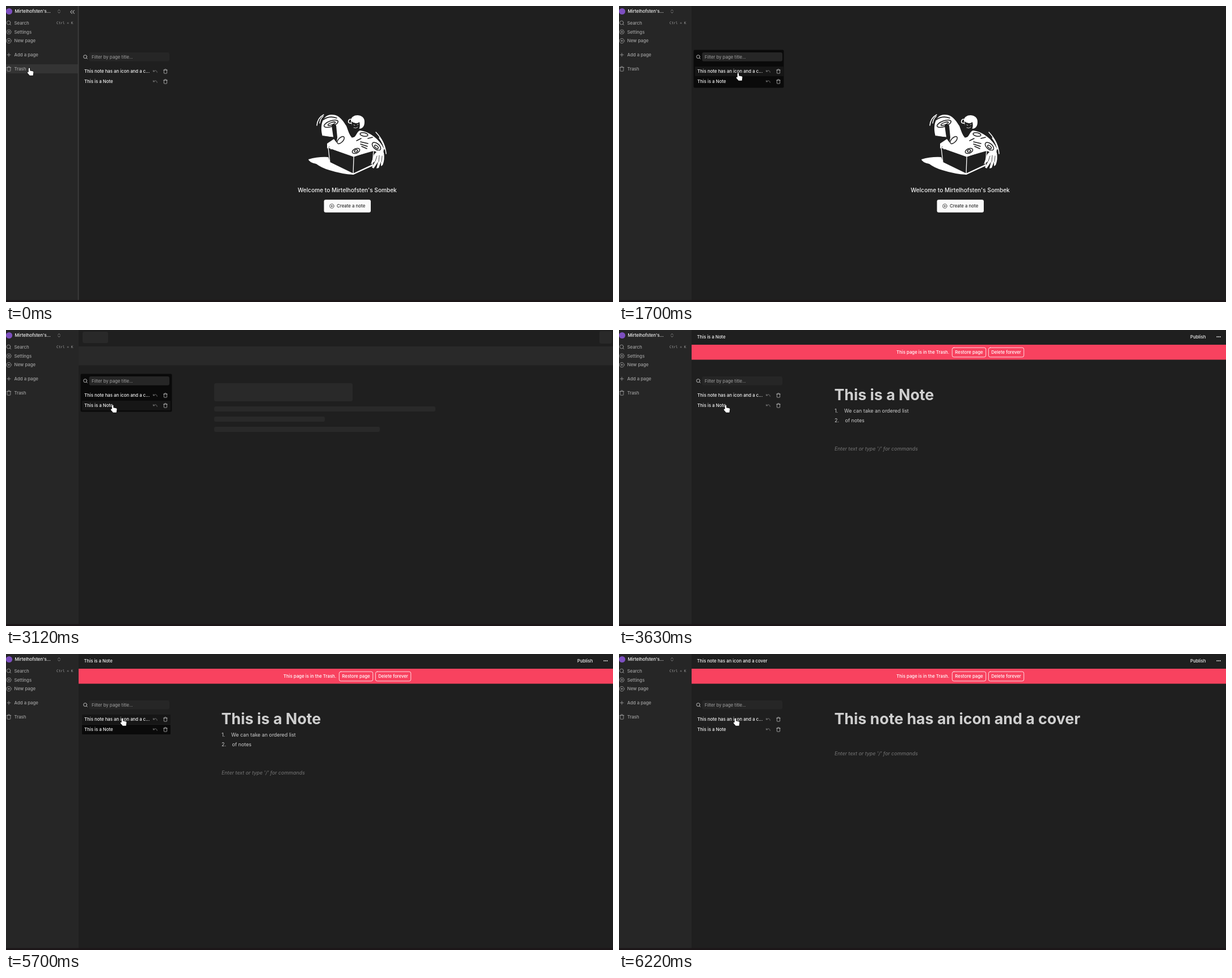
These frames come from a looping animation (1070 px wide and 523 px high, 8 s). An HTML page with a canvas:

```html
<!DOCTYPE html>
<html lang="en">
<head>
<meta charset="utf-8">
<title>Notes trash</title>
<style>
html, body { margin: 0; width: 100%; height: 100%; overflow: hidden; background: #1f1f1f; }
canvas { display: block; width: 100%; height: 100%; }
</style>
</head>
<body>
<canvas id="stage"></canvas>
<script>
const W = 1070, H = 523, LOOP = 8000;
const canvas = document.getElementById('stage');
const ctx = canvas.getContext('2d');
const ratio = window.devicePixelRatio || 1;
canvas.width = W * ratio;
canvas.height = H * ratio;

const PAGE = '#1f1f1f', MUTED = '#a0a0a0', LIGHT = '#f5f5f5', BLACK = '#0a0a0a';
const OWNER = "Mirtelhofsten's";
const NOTES = ['This note has an icon and a cover', 'This is a Note'];

const ICONS = {
  search: 'M19 11a8 8 0 1 1-16 0a8 8 0 0 1 16 0M21 21l-4.3-4.3',
  plus: 'M5 12h14M12 5v14',
  circlePlus: 'M22 12a10 10 0 1 1-20 0a10 10 0 0 1 20 0M8 12h8M12 8v8',
  trash: 'M3 6h18M19 6v14a2 2 0 0 1-2 2H7a2 2 0 0 1-2-2V6M8 6V4a2 2 0 0 1 2-2h4a2 2 0 0 1 2 2v2',
  undo: 'M3 7v6h6M21 17a9 9 0 0 0-15-6.7L3 13',
  upDown: 'M7 15l5 5 5-5M7 9l5-5 5 5',
  collapse: 'M11 17l-5-5 5-5M18 17l-5-5 5-5'
};
for (const name in ICONS) ICONS[name] = new Path2D(ICONS[name]);
ICONS.gear = gearPath();

const HAND = new Path2D('M-3.2 1V-5.3a1.2 1.2 0 0 1 2.4 0V-1.7L4-.7a1.7 1.7 0 0 1 1.4 1.9L4.6 6.8H-1.2L-4.9 2.4a1.1 1.1 0 0 1 1.7-1.4z');

function gearPath() {
  const p = new Path2D();
  for (let i = 0; i <= 64; i++) {
    const a = i / 64 * Math.PI * 2, r = 9 + 1.3 * Math.cos(8 * a);
    p.lineTo(12 + r * Math.cos(a), 12 + r * Math.sin(a));
  }
  p.moveTo(15, 12);
  p.arc(12, 12, 3, 0, 7);
  return p;
}

function box(x, y, right, bottom, fill, radius = 0, stroke) {
  ctx.beginPath();
  ctx.roundRect(x, y, right - x, bottom - y, radius);
  if (fill) { ctx.fillStyle = fill; ctx.fill(); }
  if (stroke) { ctx.strokeStyle = stroke; ctx.lineWidth = 0.8; ctx.stroke(); }
}

// y is the middle of the capital letters
function text(str, x, y, color, { size = 7.8, style = '500', align = 'left', family = 'Inter, sans-serif' } = {}) {
  ctx.font = `${style} ${size}px ${family}`;
  ctx.textAlign = align;
  ctx.fillStyle = color;
  ctx.fillText(str, x, y + size * 0.364);
}

function icon(name, cx, cy, size, color) {
  const k = size / 24;
  ctx.save();
  ctx.translate(cx, cy);
  ctx.scale(k, k);
  ctx.translate(-12, -12);
  ctx.strokeStyle = color;
  ctx.lineWidth = 2;
  ctx.stroke(ICONS[name]);
  ctx.restore();
}

// Pointer moves in 60 ms steps: start, step count, end point, easing
const easeOut = u => 1 - (1 - u) ** 1.65;
const smooth = u => u * u * (3 - 2 * u);
const MOVES = [
  [500, 14, 199, 125, easeOut],
  [1340, 12, 216, 125, easeOut],
  [2440, 5, 190, 139, smooth],
  [4770, 6, 209, 121, smooth],
  [5700, 1, 207, 120, smooth]
];

function pointerAt(t) {
  let x = 43, y = 116;
  for (const [start, steps, toX, toY, ease] of MOVES) {
    if (t < start) break;
    const u = ease(Math.min(steps, Math.floor((t - start) / 60) + 1) / steps);
    x += (toX - x) * u;
    y += (toY - y) * u;
  }
  return { x, y };
}

function drawSidebar(hovered) {
  box(0, 0, 128, H, '#262626');
  if (hovered) {
    box(0, 103, 127, 119, '#343434');
    box(126.5, 0, 128.5, H, '#3b3b3b');
    icon('collapse', 117, 10.5, 13.4, MUTED);
  }
  ctx.fillStyle = '#7d4fc0';
  ctx.beginPath();
  ctx.arc(5.5, 9.5, 5.6, 0, 7);
  ctx.fill();
  text(OWNER + '...', 15.5, 9.5, LIGHT);
  icon('upDown', 93.5, 9.5, 9, MUTED);
  const items = [
    ['search', 'Search', 30], ['gear', 'Settings', 45.8], ['circlePlus', 'New page', 61.6],
    ['plus', 'Add a page', 86.2], ['trash', 'Trash', 111]
  ];
  for (const [name, label, y] of items) {
    icon(name, 5, y, 10, MUTED);
    text(label, 14.5, y, MUTED);
  }
  text('Ctrl + K', 89, 30, MUTED, { size: 6.1, style: '400', family: '"DejaVu Sans Mono", monospace' });
}

function drawPopover(t, tipY) {
  const solid = (t >= 860 && t < 3260) || (t >= 5780 && t < 5910);
  const rowsOnly = t >= 4770 && t < 5780 && tipY < 124.5;
  const right = t < 3120 ? 290.5 : 292.5;
  if (solid) box(131.5, 77.5, right, 144.5, BLACK, 2);
  if (solid || rowsOnly) {
    const hover = tipY < 124.5 ? 0 : 1;
    for (let i = 0; i < 2; i++) {
      box(134, 107 + i * 18, 290, 124 + i * 18, i === hover ? '#161616' : BLACK, 1);
    }
  }
  icon('search', 140, 90, 8.9, LIGHT);
  box(146.5, 82, 288, 97.7, '#262626', 3);
  text('Filter by page title...', 151, 90, MUTED, { style: '400' });
  ['This note has an icon and a c...', NOTES[1]].forEach((label, i) => {
    const y = 115.4 + i * 18;
    text(label, 138, y, LIGHT, { size: 7.8 });
    icon('undo', 263, y, 8.9, '#8c8c8c');
    icon('trash', 281, y, 8.9, '#c8c8c8');
  });
}

function fillPath(d, color) {
  ctx.fillStyle = color;
  ctx.fill(new Path2D(d));
}

function strokePath(d, color, width) {
  ctx.strokeStyle = color;
  ctx.lineWidth = width;
  ctx.stroke(new Path2D(d));
}

function ring(x, y, rx, ry, turn) {
  ctx.beginPath();
  ctx.ellipse(x, y, rx, ry, turn, 0, 7);
  ctx.strokeStyle = PAGE;
  ctx.lineWidth = 1.5;
  ctx.stroke();
}

function drawArt() {
  const white = '#fff';
  // Floor shadow and carton
  fillPath('M533 271Q550 266 568 267L572 278L613 298Q592 297 570 290Q556 286 547 279Q534 276 533 271Z', white);
  const left = 'M568 250L613 266L612 297L571 277Z', right = 'M613 266L648 254L646 282L612 297Z';
  fillPath(left, PAGE);
  fillPath(right, PAGE);
  strokePath(left + right, white, 1.3);
  strokePath('M571 277L612 297L646 281', white, 2.2);
  // Patterned blanket
  fillPath('M558 230C553 213 557 192 574 192C588 192 594 203 600 212C604 223 607 233 613 232C618 230 618 222 624 220C641 222 659 236 666 252L665 262L648 256L613 266L584 256L568 250L581 244L583 232Z', white);
  ring(573, 208, 13, 5, -0.35);
  ring(574, 208, 7, 2, -0.35);
  ring(590, 237, 8, 4, -0.8);
  ring(631, 227, 7, 3, 0.2);
  ring(653, 248, 9, 5, 0.7);
  ring(653, 249, 4, 2, 0.7);
  ring(617, 256, 7, 4, -0.4);
  ring(617, 256, 3, 2, -0.4);
  strokePath('M559 201Q570 193 583 198M625 240L638 243M625 244L637 248M627 248L636 252M618 238L626 234M638 234L646 232', PAGE, 1.6);
  // Arm on the left
  fillPath('M558 229L577 232L574 211Q578 206 582 211L584 232L582 247L565 250Z', PAGE);
  fillPath('M566 243L578 235L587 247L584 254L580 248L580 255L576 248L573 254L570 248L566 252Z', white);
  // Head and neck
  fillPath('M602 209L618 214Q618 229 610 233Q603 225 602 209Z', PAGE);
  fillPath('M608 203C608 189 633 190 632 205C632 214 627 217 622 217L609 210Z', white);
  fillPath('M609 204Q617 210 623 205Q626 218 617 222Q609 219 609 204Z', PAGE);
  strokePath('M609 207Q602 208 604 202Q607 198 611 202', white, 1.7);
  strokePath('M613 215Q617 217 620 214M613 210L615 211M619 210L621 209', white, 0.8);
  // Hand on the right
  fillPath('M649 262L656 255L666 259Q668 271 664 281L661 283L661 275L657 286L653 287L656 275L648 287L645 285L651 274L643 280Z', white);
  strokePath('M658 264L657 275M663 265L662 275M654 265L651 274', PAGE, 0.8);
  // Movement lines
  strokePath('M548 211Q549 198 560 192M553 207Q554 199 559 195M652 223Q668 240 670 261M658 233Q666 244 667 253', white, 1.5);
}

function drawWelcome() {
  drawArt();
  text(`Welcome to ${OWNER} Sombek`, 601.5, 325, LIGHT, { size: 10.1, align: 'center' });
  box(560.5, 342.3, 643, 364.8, '#fafafa', 3);
  icon('circlePlus', 574.3, 353.5, 9, '#222');
  text('Create a note', 583, 353.5, '#2b2b2b', { size: 7.85 });
}

function drawSkeleton() {
  const gray = '#292929';
  box(128, 29, W, 62.5, gray);
  box(135, 3, 180, 23, gray, 3);
  box(1046, 2, 1068, 24, gray, 3);
  box(367, 94, 611, 126, gray, 3);
  [[135, 757], [153, 562], [171, 659]].forEach(([y, right]) => box(367, y, right, y + 9, gray, 3));
}

function drawNote(title, hasList, loaded) {
  text(title, 137.5, 12, LIGHT, { size: 7.75 });
  text('Publish', 1007, 12, LIGHT);
  for (let i = -1; i < 2; i++) {
    ctx.fillStyle = LIGHT;
    ctx.beginPath();
    ctx.arc(1057 + i * 2.7, 12, 0.9, 0, 7);
    ctx.fill();
  }
  box(128, 26, W, 52.5, '#f8425f');
  text('This page is in the Trash.', 489, 39.5, '#fff');
  box(587.3, 31.2, 646.7, 47.8, null, 3, '#fff');
  box(651.4, 31.2, 713.7, 47.8, null, 3, '#fff');
  text('Restore page', 617, 39.5, '#fff', { align: 'center' });
  text('Delete forever', 682.5, 39.5, '#fff', { align: 'center' });

  const ink = '#cfcfcf', body = { size: 8.85, style: '400' };
  text(title, 379.5, 114, ink, { size: 26.75, style: '700' });
  if (!loaded) return;
  if (hasList) {
    text('1.', 380, 142.5, ink, body);
    text('We can take an ordered list', 397, 142.5, ink, body);
    text('2.', 380, 159.5, ink, body);
    text('of notes', 398.5, 159.5, ink, body);
  }
  text("Enter text or type '/' for commands", 380, hasList ? 210 : 176, '#777', { size: 8.9, style: 'italic 400' });
}

function drawPointer({ x, y }) {
  ctx.save();
  ctx.translate(x, y);
  ctx.strokeStyle = '#111';
  ctx.lineWidth = 1.4;
  ctx.stroke(HAND);
  ctx.fillStyle = '#fff';
  ctx.fill(HAND);
  ctx.restore();
}

function draw(t) {
  ctx.setTransform(ratio, 0, 0, ratio, 0, 0);
  ctx.lineCap = ctx.lineJoin = 'round';
  box(0, 0, W, H, PAGE);
  if (t < 3120) drawWelcome();
  else if (t < 3260) drawSkeleton();
  else if (t < 5780) drawNote(NOTES[1], true, t >= 3630);
  else if (t < 5910) drawSkeleton();
  else drawNote(NOTES[0], false, t >= 6220);
  const pointer = pointerAt(t);
  drawSidebar(t < 860);
  drawPopover(t, pointer.y - 6);
  box(0, 519.5, W, H, '#1c1618');
  drawPointer(pointer);
}

const begin = performance.now();
function tick() {
  draw((performance.now() - begin) % LOOP);
  requestAnimationFrame(tick);
}
tick();
</script>
</body>
</html>
```
